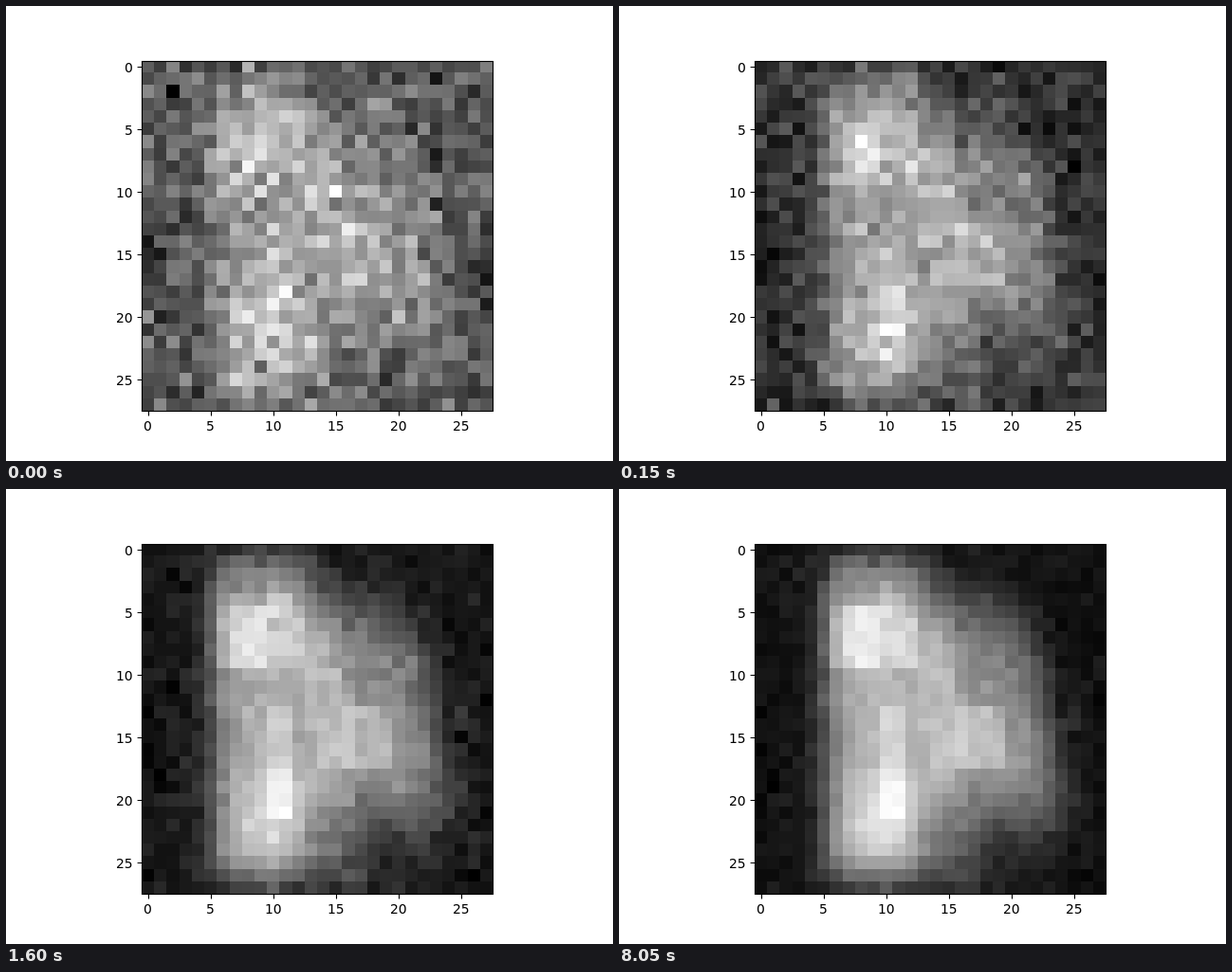
Animation, 640 px wide and 480 px high, one loop 10 s. Source, as an HTML page with a canvas:

```html
<!DOCTYPE html>
<html lang="en">
<head>
<meta charset="utf-8">
<title>Running mean of noisy images</title>
<style>
  html, body { margin: 0; width: 100%; height: 100%; overflow: hidden; background: #fff; }
  canvas { display: block; }
</style>
</head>
<body>
<canvas id="stage" width="640" height="480"></canvas>
<script>
const ctx = document.getElementById('stage').getContext('2d');
const SIZE = 28, STEPS = 200, STEP_MS = 50, NOISE = 46, TEXTURE = 5;

let seed = 7;
function random() {
  seed = seed + 0x6D2B79F5 | 0;
  let r = Math.imul(seed ^ seed >>> 15, 1 | seed);
  r = r + Math.imul(r ^ r >>> 7, 61 | r) ^ r;
  return ((r ^ r >>> 14) >>> 0) / 4294967296;
}
const gauss = () =>
  Math.sqrt(-2 * Math.log(1 - random())) * Math.cos(2 * Math.PI * random());

const rise = v => 1 / (1 + Math.exp(-v));
const band = (v, from, to, soft) => rise((v - from) / soft) * rise((to - v) / soft);

// Brightness of the clean shape: soft bands for the body, crisper ones for highlights
function shapeAt(x, y) {
  const body = 145 * band(x, 5.4, 13, .8) * band(y, 1, 26.3, .9);
  const core = 125 * band(x, 12.9, 15.6, .6) * band(y, 4.6, 20.5, 1);
  const side = (85 + 2.2 * y) * band(x, 15.2, 18 + 1.3 * Math.sqrt(y), .8) * band(y, 4.5, 21.3, 1.6);
  const belly = 38 * band(x, 15.5, 19.5, .2) * band(y, 12.5, 17.5, .2);
  const head = 53 * band(x, 5.5, 9, .3) * band(y, 4.5, 9.5, .2);
  const neck = 35 * band(x, 9, 12.5, .2) * band(y, 4.5, 9.5, .2);
  const spine = 38 * band(x, 9.5, 11.5, .2) * band(y, 12.5, 21.5, .2);
  const base = 40 * band(x, 6.8, 13.2, .8) * band(y, 18.5, 25, .8);
  const foot = 45 * band(x, 13.5, 17.5, .4) * band(y, 21, 27.3, .6);
  return 26 + body + core + side + belly + head + neck + spine + base + foot;
}

const shape = Array.from({ length: SIZE * SIZE }, (_, i) =>
  shapeAt(i % SIZE, Math.floor(i / SIZE)) + TEXTURE * gauss());

// Each image is the mean of all samples so far, scaled to the full grey range
function buildImages() {
  const total = shape.map(() => 0);
  const images = [];
  for (let n = 1; n <= STEPS; n++) {
    const mean = shape.map((v, i) => v + (total[i] += NOISE * gauss()) / n);
    const low = Math.min(...mean), range = Math.max(...mean) - low;
    images.push(mean.map(v => Math.round((v - low) / range * 255)));
  }
  return images;
}
const images = buildImages();

const edge = (start, i) => Math.round(start + i * 370 / SIZE);

function drawCells(image) {
  image.forEach((grey, i) => {
    const col = i % SIZE, row = Math.floor(i / SIZE);
    const x = edge(143, col), y = Math.max(58, edge(57, row));
    ctx.fillStyle = `rgb(${grey},${grey},${grey})`;
    ctx.fillRect(x, y, edge(143, col + 1) - x, edge(57, row + 1) - y);
  });
}

function drawAxes() {
  ctx.strokeStyle = ctx.fillStyle = '#000';
  ctx.lineWidth = 1.11;
  ctx.font = '13.89px "DejaVu Sans", sans-serif';
  ctx.strokeRect(143.5, 58.5, 370, 369);
  ctx.beginPath();
  for (let k = 0; k < 6; k++) {
    const x = 150.5 + 66 * k, y = 64.5 + 66 * k, label = String(5 * k);
    const width = ctx.measureText(label).width;
    ctx.moveTo(x, 427.5);
    ctx.lineTo(x, 432.4);
    ctx.moveTo(143.5, y);
    ctx.lineTo(138.6, y);
    ctx.fillText(label, Math.round(x - .7 - width / 2), 448);
    ctx.fillText(label, Math.round(133.5 - width), y + 5.5);
  }
  ctx.stroke();
}

let shown = -1;
function tick() {
  const step = Math.floor(performance.now() / STEP_MS) % STEPS;
  if (step !== shown) {
    shown = step;
    ctx.fillStyle = '#fff';
    ctx.fillRect(0, 0, 640, 480);
    drawCells(images[step]);
    drawAxes();
  }
  requestAnimationFrame(tick);
}
tick();
</script>
</body>
</html>
```
